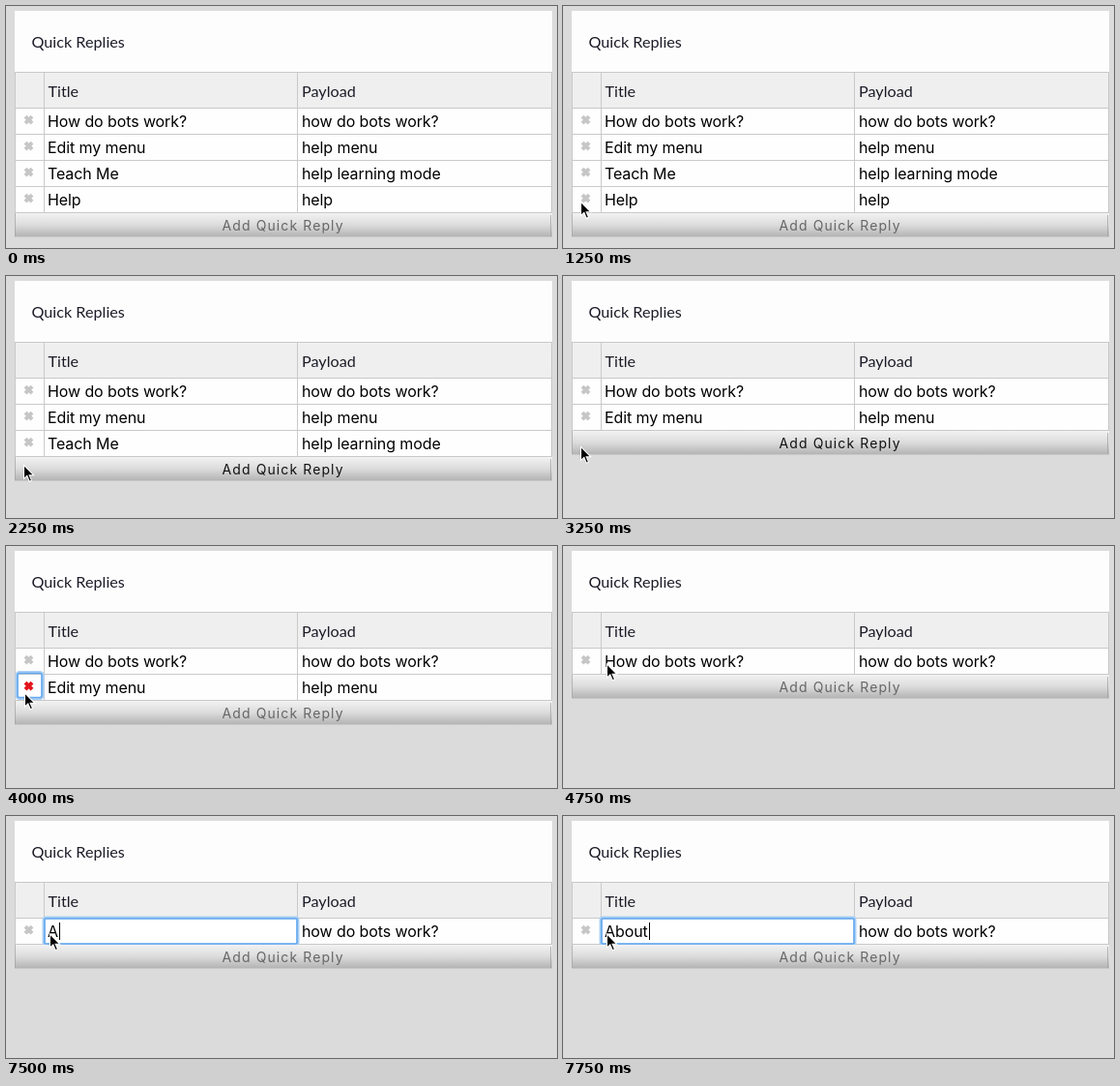
These frames come from a looping animation (570 px wide and 250 px high, 8 s). An HTML page:

```html
<!DOCTYPE html>
<html lang="en">
<head>
<meta charset="utf-8">
<title>Quick Replies</title>
<style>
  html, body { margin: 0; width: 100%; height: 100%; overflow: hidden; background: #dbdbdb; }
  svg { display: block; width: 570px; height: 250px; }
  .label { font: 16.2px Lato, sans-serif; fill: #1c1c28; }
  .cell { font: 16px Inter, sans-serif; letter-spacing: -.1px; fill: #000; }
  .add { font: 14px Inter, sans-serif; letter-spacing: 1.1px; }
  .line { stroke: #c9c9c9; shape-rendering: crispEdges; }
</style>
</head>
<body>
<svg viewBox="0 0 570 250">
  <defs>
    <linearGradient id="metal" x2="0" y2="1">
      <stop offset="0" stop-color="#f2f2f2"/>
      <stop offset=".5" stop-color="#dcdcdc"/>
      <stop offset="1" stop-color="#b4b4b4"/>
    </linearGradient>
  </defs>
  <rect width="570" height="250" fill="#dbdbdb"/>
  <rect x="9" y="5" width="556" height="63" fill="#fdfdfd"/>
  <rect x="9" y="68" width="556" height="38" fill="#efefef"/>
  <path class="line" d="M9 68.5H565M9 105.5H565M9.5 69V106M39.5 69V106M301.5 69V106M564.5 69V106"/>
  <text class="label" x="26.5" y="43">Quick Replies</text>
  <text class="label" x="43.5" y="94">Title</text>
  <text class="label" x="306" y="94">Payload</text>
  <g id="rows"></g>
  <g id="edit">
    <rect x="39" y="105" width="263" height="28" rx="2" fill="#fff" stroke="#a9cff5" stroke-width="3"/>
    <rect x="40" y="106" width="261" height="26" rx="1" fill="none" stroke="#64a8ee" stroke-width="1.6"/>
    <rect id="mark" x="44" y="110" height="18" fill="#b0d5fb"/>
    <text id="field" class="cell" x="43" y="125"></text>
    <rect id="caret" y="110" width="1" height="18" fill="#000"/>
  </g>
  <g id="button">
    <rect x="9" width="556" height="24" fill="url(#metal)"/>
    <path d="M9.5 0V24M563.5 2V24" stroke="#a4a4a4" opacity=".75"/>
    <path d="M9 24.5H565" stroke="#c8c8c8"/>
    <text id="add" class="add" x="223.5" y="17.5">Add Quick Reply</text>
  </g>
  <g id="ring" fill="none">
    <rect x="11" width="27" height="27" rx="3" stroke="#a9cff5" stroke-width="3"/>
    <rect x="12" y="1" width="25" height="25" rx="2" stroke="#64a8ee" stroke-width="1.6"/>
  </g>
  <g id="cursor">
    <path d="M0 -.7V15.6L3.6 12.3 6 17.9 9 16.6 6.7 11.3H11.8Z" fill="#fff"/>
    <path d="M1 1.7V13.2L4 10.5 6.5 16.5 7.8 15.9 5.3 10.2H9.4Z"/>
  </g>
</svg>
<script>
const LOOP = 8000, TOP = 106, STEP = 27;
const REPLIES = [
  ["How do bots work?", "how do bots work?"],
  ["Edit my menu", "help menu"],
  ["Teach Me", "help learning mode"],
  ["Help", "help"]
];
// Pointer stops: time, x, y
const STOPS = [
  [750, 24, 196], [1000, 21, 198], [1250, 18, 202], [1750, 18, 201],
  [2000, 18, 196], [2250, 18, 195], [2500, 18, 179], [2750, 18, 178],
  [3250, 18, 176], [3500, 17.5, 160], [3750, 19, 151.5], [4500, 41, 128],
  [4750, 45, 121.5]
];
const REMOVED = [4250, 3250, 2250];
// Cross under the pointer: from, to, row
const HOVER = [[1750, 2250, 3], [2500, 3250, 2], [3750, 4250, 1]];

const $ = id => document.getElementById(id);
const show = (el, on) => el.setAttribute("display", on ? "inline" : "none");
const move = (el, x, y) => el.setAttribute("transform", `translate(${x} ${y})`);
const within = (t, from, to) => t >= from && t < to;

$("rows").innerHTML = REPLIES.map(([title, payload], i) => `
  <g transform="translate(0 ${TOP + i * STEP})">
    <rect x="9" width="556" height="27" fill="#fefefe"/>
    <path class="line" d="M9 26.5H565M9.5 0V27M39.5 0V27M301.5 0V27M564.5 0V27"/>
    <path class="cross" d="M20 8.2L27 15.2M27 8.2L20 15.2" stroke-width="4"/>
    <text class="cell" x="43" y="19">${title}</text>
    <text class="cell" x="306" y="19">${payload}</text>
  </g>`).join("");
const rows = [...$("rows").children];
const crosses = rows.map(row => row.querySelector(".cross"));

function drawEdit(t) {
  show($("edit"), t >= 5000);
  const typed = t < 7500 ? REPLIES[0][0] : t < 7750 ? "A" : "About";
  $("field").textContent = typed;
  $("mark").setAttribute("width", within(t, 5250, 5750) ? 33 : within(t, 5750, 7500) ? 144 : 0);
  show($("caret"), t >= 7500);
  $("caret").setAttribute("x", t < 7750 ? 55 : 89);
}

function draw(t) {
  const count = 1 + REMOVED.filter(at => t < at).length;
  const hover = HOVER.find(([from, to]) => within(t, from, to));
  const active = hover ? hover[2] : -1;
  rows.forEach((row, i) => {
    show(row, i < count);
    crosses[i].setAttribute("stroke", i === active ? "#e3141c" : "#c6c6c6");
  });

  show($("ring"), hover && t >= hover[1] - 250);
  move($("ring"), 0, TOP + active * STEP - 2.5);
  move($("button"), 0, TOP + count * STEP);
  const over = REMOVED.some(at => within(t, at, at + 250));
  $("add").setAttribute("fill", over ? "#111" : "#666");

  const stop = STOPS.filter(([at]) => t >= at).pop();
  show($("cursor"), stop);
  if (stop) move($("cursor"), stop[1], stop[2]);
  drawEdit(t);
}

const start = performance.now();
function tick() {
  draw((performance.now() - start) % LOOP);
  requestAnimationFrame(tick);
}
draw(0);
requestAnimationFrame(tick);
</script>
</body>
</html>
```
